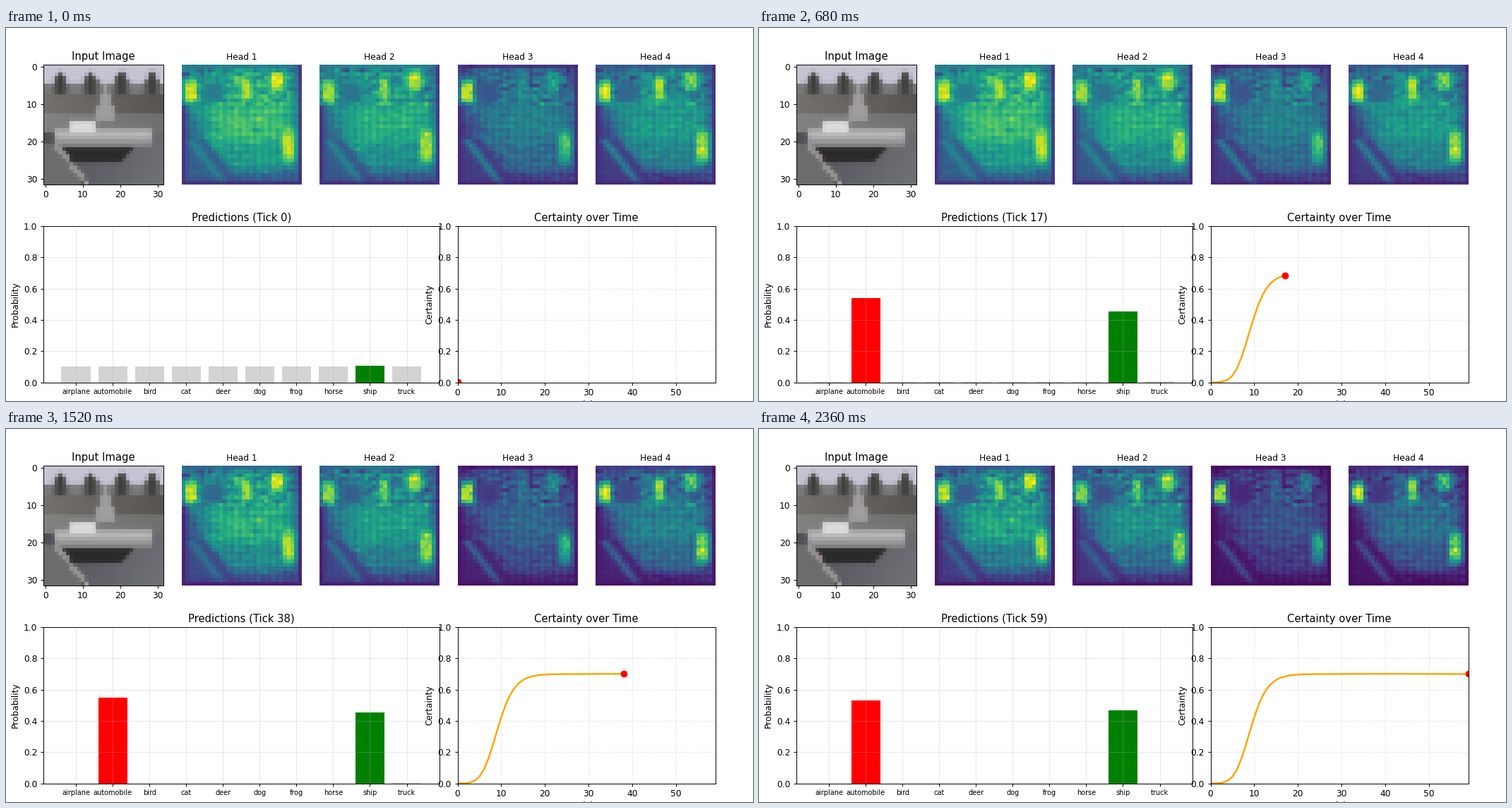
Animation of 1058x529 px, one loop 2400 ms. Source, as a matplotlib script:

```python
import numpy as np
import matplotlib.pyplot as plt
from matplotlib.animation import FuncAnimation

W, H = 1058, 529
TICKS, STEP_MS, N = 60, 40, 32
LEFT, PITCH, SIDE = 53, 195.5, 169.8

# How strongly the model leans to each class
LEANING = {"airplane": 0.3, "automobile": 1.76, "bird": 0.2, "cat": 0.15,
           "deer": -0.25, "dog": 0, "frog": 0, "horse": -0.5,
           "ship": 1.76, "truck": 0.96}
LABELS = list(LEANING)
RIVAL, TRUE = LABELS.index("automobile"), LABELS.index("ship")

plt.rcParams["font.family"] = "DejaVu Sans"
fig = plt.figure(figsize=(12, 6), dpi=W / 12, facecolor="white")
y, x = np.mgrid[0:N, 0:N].astype(float)


def add_axes(column, top, span, height):
    width = (span - 1) * PITCH + SIDE
    return fig.add_axes([(LEFT + column * PITCH) / W, 1 - (top + height) / H,
                         width / W, height / H])


def paint_scene():
    """A boat by a wooded bank, as soft flat shapes."""
    img = np.zeros((N, N, 3))

    def fill(mask, tone, tint=(0, 0, 0)):
        shade = np.broadcast_to(tone, (N, N))[..., None] + np.array(tint)
        img[mask] = shade[mask]

    fill(y < 8, 198, (0, -2, 12))
    tree = np.cos(np.pi * (x - 4) / 8.15) ** 4
    fill((y > 5 - 3.5 * tree) & (y < 9), 122 - 62 * tree)
    fill((y > 7) & (y < 13), 112 - 0.9 * x, (4, 0, -4))
    fill((y > 12) & (y < 18), 130 - 0.6 * x)
    fill((abs(x - 16) < (y - 4) * 0.3) & (y < 15), 158)

    fill(y > 17, 78 + 0.9 * x + 0.5 * (y - 18), (0, 1, 7))
    fill((y > 20) & (x < (y - 19) * 0.75 + 1), 108)

    fill((y > 16) & (y < 22) & (x > 2) & (x < 29), 186 - 18 * abs(y - 18))
    fill((y > 14) & (y < 18) & (x > 6) & (x < 14), 220)
    fill((y > 21) & (y < 26) & (x > y - 19) & (x < 46 - y), 42)

    rope = x - 3 - (y - 21) * 0.78
    fill((y > 20) & (abs(rope) < 0.8), 160, (0, -6, -9))
    soft = sum(np.roll(img, s, a) for s in (-1, 1) for a in (0, 1)) / 4
    img[1:-1, 1:-1] = (0.65 * img + 0.35 * soft)[1:-1, 1:-1]
    return np.clip(img / 255, 0, 1)


# Column, row, width and height of the spots every head attends to
SPOTS = [(2, 6.7, 1.8, 3.2), (16.5, 6, 1.5, 3.4), (25, 3.8, 2.1, 2.6), (28.3, 21.2, 2, 4.6)]


def attention(seed, low, mid, top, peaks):
    rng = np.random.default_rng(seed)
    v = np.full((N, N), low)

    def blend(mask, level):
        v[:] += mask * (level - v)

    def spot(c, r, w, h, level, power=4):
        blend(np.exp(-abs((x - c) / w) ** power - abs((y - r) / h) ** power), level)

    spot(17, 6, 16, 7, 0.83 * mid)
    spot(18, 16, 14, 8, mid)
    spot(20, 24, 11, 4, 0.8 * mid)

    grain = rng.normal(size=(N, N))
    grain = (grain + np.roll(grain, 1, 1)) / 1.4
    v[:] += grain * np.where(y < 11, 0.07, 0.03)
    v[:] += 0.025 * np.cos(np.pi * x) + 0.015 * np.cos(np.pi * y)

    # Dim lower-left wedge, crossed by the bright rope and its shadow
    blend(0.75 / (1 + np.exp(-(y - 14 - 1.3 * x) / 1.5)), 0.9 * low)
    rope = x - 2 - (y - 20) * 0.78
    blend(0.7 * (y > 19) * np.exp(-((rope - 3) / 1.4) ** 2), 0.75 * low)
    blend(0.8 * (y > 19) * np.exp(-(rope / 1.2) ** 2), 0.48)

    spot(8, 7, 3, 3, 0.6 * mid)
    blend(0.8 * (y < 1), top)
    for place, level in zip(SPOTS, peaks):
        spot(*place, level + 0.05 * rng.normal(size=(N, N)))

    # Dark rim: bottom, right and lower left
    rim = np.minimum(np.minimum(31 - x, 31 - y), np.where(y > 10, x, 9))
    blend(0.75 * np.exp(-rim / 0.9), 0.1)
    return np.clip(v, 0.02, 1)


MAPS = [
    attention(3, 0.34, 0.69, 0.42, (0.93, 0.87, 0.95, 0.93)),
    attention(8, 0.32, 0.63, 0.45, (0.88, 0.80, 0.88, 0.93)),
    attention(14, 0.20, 0.44, 0.12, (0.92, 0.50, 0.58, 0.72)),
    attention(21, 0.20, 0.55, 0.28, (0.96, 0.90, 0.80, 0.90)),
]


def map_at(i, t):
    """Weak attention fades late in the loop, faster in the last two heads."""
    k = np.clip((t - 15) / 44, 0, 1)
    rate = 0.45 if i < 2 else 0.65
    return MAPS[i] ** (1 + rate * k * k * (3 - 2 * k))


def probs_at(t):
    """Softmax whose gain grows with time; the two leaders sway slowly."""
    logits = np.array(list(LEANING.values())) * (t / 7) ** 1.9
    sway = np.cos(2 * np.pi * np.log(max(t, 1) / 17) / np.log(2.35))
    logits[RIVAL] += (0.16 + 0.035 * sway) * (1 - np.exp(-t / 9))
    logits[TRUE] += 0.05 * np.exp(-t)
    p = np.exp(logits - logits.max())
    return p / p.sum()


def certainty_of(p):
    return 1 + (p * np.log(p + 1e-12)).sum() / np.log(len(p))


steps = np.arange(TICKS)
certainty = np.array([certainty_of(probs_at(t)) for t in steps])

ax_in = add_axes(0, 52, 1, SIDE)
ax_in.imshow(paint_scene(), interpolation="nearest", aspect="auto")
ax_in.set_title("Input Image")
ax_in.set_xticks(range(0, N, 10))
ax_in.set_yticks(range(0, N, 10))

heads = []
for i in range(4):
    ax = add_axes(i + 1, 52, 1, SIDE)
    ax.axis("off")
    ax.set_title(f"Head {i + 1}", fontsize=10)
    heads.append(ax.imshow(MAPS[i], cmap="viridis", vmin=0, vmax=1,
                           interpolation="nearest", aspect="auto"))

ax_bar = add_axes(0, 281, 3, 221.5)
bars = ax_bar.bar(LABELS, probs_at(0))
ax_bar.set_ylim(0, 1)
ax_bar.tick_params(axis="x", labelsize=8)
ax_bar.set_ylabel("Probability")
ax_bar.grid(True, alpha=0.3)
title = ax_bar.set_title("Predictions (Tick 0)")

ax_cert = add_axes(3, 281, 2, 221.5)
ax_cert.set_xlim(0, TICKS - 1)
ax_cert.set_ylim(0, 1)
ax_cert.set_title("Certainty over Time")
ax_cert.set_xlabel("Tick", labelpad=3)
ax_cert.set_ylabel("Certainty")
ax_cert.grid(True, linestyle="--", alpha=0.3)
curve, = ax_cert.plot([], [], color="orange", linewidth=2)
dot, = ax_cert.plot([], [], "ro", markersize=7)


def draw(t):
    for i, im in enumerate(heads):
        im.set_data(map_at(i, t))
    p = probs_at(t)
    guess = p.argmax()
    for k, bar in enumerate(bars):
        bar.set_height(p[k])
        bar.set_facecolor("green" if k == TRUE else "red" if k == guess else "lightgray")
    title.set_text(f"Predictions (Tick {t})")
    curve.set_data(steps[:t + 1], certainty[:t + 1])
    dot.set_data([t], [certainty[t]])
    return [*heads, *bars, title, curve, dot]


anim = FuncAnimation(fig, draw, frames=TICKS, interval=STEP_MS,
                     repeat=True, repeat_delay=0, blit=False)
plt.show()
```
